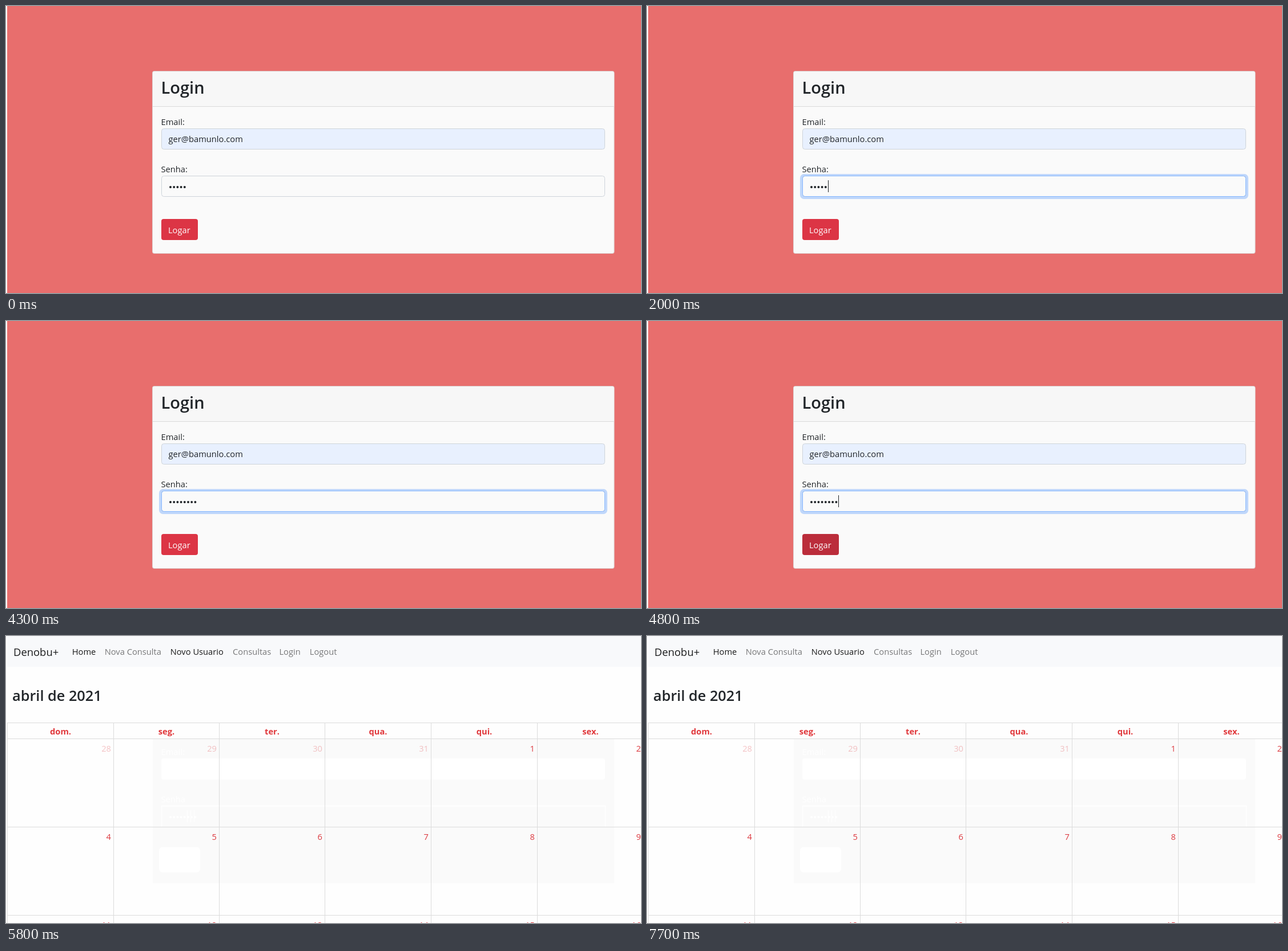
An HTML page for the animation above (8 s loop, 1112 px wide and 504 px high).

```html
<!DOCTYPE html>
<html lang="pt-BR">
<head>
<meta charset="utf-8">
<title>Login</title>
<style>
html, body { margin: 0; width: 100%; height: 100%; overflow: hidden; background: #fff; }
svg { display: block; width: 1112px; height: 504px; }
text { font: 400 14.7px "Open Sans", "Noto Sans", sans-serif; fill: #212529; }
.title { font-size: 29px; font-weight: 600; }
.month { font-size: 25.3px; font-weight: 600; }
.brand { font-size: 18.4px; fill: #1a1b1c; }
.head { font-weight: 700; fill: #e0373b; text-anchor: middle; }
.day { fill: #dc3a40; text-anchor: end; }
.out { opacity: .3; }
.white { fill: #fff; }
</style>
</head>
<body>
<svg id="stage" viewBox="0 0 1112 504">
  <g id="login">
    <rect x="2" width="1110" height="504" fill="#e86e6d"/>
    <rect x="256" y="114" width="809.5" height="321" rx="4" fill="#dccfcf"/>
    <rect x="257" y="115" width="807.5" height="319" rx="3" fill="#fafafa"/>
    <path d="M257 176V118a3 3 0 0 1 3-3H1061.5a3 3 0 0 1 3 3V176Z" fill="#f7f7f7"/>
    <rect x="257" y="176" width="807.5" height="1" fill="#dadada"/>
    <text class="title" x="271.5" y="154">Login</text>
    <text x="271.5" y="209">Email:</text>
    <rect x="272.5" y="215.5" width="776" height="36" rx="4" fill="#e8f0fe" stroke="#ced4da"/>
    <text x="284.5" y="239">ger@bamunlo.com</text>
    <text x="271.5" y="292">Senha:</text>
    <rect id="ring" x="268" y="295" width="785" height="44" rx="7" fill="#bfd7fb"/>
    <rect x="272.5" y="298.5" width="776" height="36" rx="4" fill="#fafafa" stroke="#ced4da"/>
    <rect id="edge" x="272.5" y="298.5" width="776" height="36" rx="4" fill="none" stroke="#86b7fe"/>
    <g id="dots" fill="#212529"></g>
    <rect id="caret" y="306" width="1" height="21" fill="#212529"/>
    <rect id="halo" x="268" y="370.5" width="72" height="44.5" rx="7" fill="#eea7ae"/>
    <rect id="button" x="272" y="374" width="64" height="37" rx="4"/>
    <text class="white" x="284" y="399">Logar</text>
  </g>
  <g id="agenda">
    <rect x="2" width="1110" height="504" fill="#fefefe"/>
    <rect x="2" width="1110" height="54" fill="#f8f9fb"/>
    <text class="brand" x="13" y="35">Denobu+</text>
    <text class="month" x="11" y="114">abril de 2021</text>
    <g id="ghost">
      <path d="M257 181H1065V434H257Z" fill="#fafafa"/>
      <text class="white" x="271.5" y="209">Email:</text>
      <rect class="white" x="272" y="215" width="777" height="37" rx="4"/>
      <text class="white" x="271.5" y="292">Senha</text>
      <path d="M272.5 335V298.5H1049.5V335" fill="none" stroke="#fff" stroke-width="1.5"/>
      <g id="ghostDots" fill="#fff"></g>
      <rect class="white" x="268" y="370.5" width="72" height="44.5" rx="6"/>
    </g>
  </g>
</svg>
<script>
const $ = id => document.getElementById(id);

function add(parent, tag, attrs, label) {
  const el = document.createElementNS("http://www.w3.org/2000/svg", tag);
  for (const k in attrs) el.setAttribute(k, attrs[k]);
  if (label !== undefined) el.textContent = label;
  parent.appendChild(el);
  return el;
}

// Password bullets
const dots = [];
for (let i = 0; i < 8; i++) {
  const at = { cx: 288 + 6.2 * i, cy: 318, r: 2 };
  dots.push(add($("dots"), "circle", at));
  add($("ghostDots"), "circle", at);
}
for (const x of [317, 323, 329]) add($("ghostDots"), "rect", { x, y: 306, width: 1, height: 21 });

// Navigation
const agenda = $("agenda");
const nav = [
  ["Home", 115.7, .9], ["Nova Consulta", 172.7, .52], ["Novo Usuario", 287.7, .9],
  ["Consultas", 397, .52], ["Login", 478.5, .52], ["Logout", 531.8, .52]
].map(([label, x, shade]) => add(agenda, "text", { x, y: 33, style: `fill:rgba(0,0,0,${shade})` }, label));

// Calendar grid
const cols = [2, 188, 373, 558, 744, 930, 1116];
for (const x of cols.slice(0, 6)) add(agenda, "rect", { x, y: 152, width: 1, height: 352, fill: "#dcdcdc" });
for (const y of [152, 180, 335, 490]) add(agenda, "rect", { x: 2, y, width: 1110, height: 1, fill: "#dcdcdc" });
["dom.", "seg.", "ter.", "qua.", "qui.", "sex."].forEach((name, c) => {
  add(agenda, "text", { class: "head", x: (cols[c] + cols[c + 1]) / 2 + .5, y: 173 }, name);
  for (let r = 0; r < 3; r++) {
    const n = 28 + c + 7 * r, out = n < 32;
    add(agenda, "text", { class: out ? "day out" : "day", x: cols[c + 1] - 4, y: 203 + 155 * r }, out ? n : n - 31);
  }
});

const within = (t, a, b) => t >= a && t < b;
const show = (el, on) => el.setAttribute("visibility", on ? "visible" : "hidden");

function focusAt(t) {
  if (t < 1000 || t >= 5100) return 0;
  if (t < 1100) return .25;
  if (t < 1200) return .85;
  return t < 5000 ? 1 : .5;
}

function draw(t) {
  const onLogin = t < 5800;
  $("login").style.display = onLogin ? "" : "none";
  agenda.style.display = onLogin ? "none" : "";

  const focus = focusAt(t);
  $("ring").setAttribute("opacity", focus);
  $("edge").setAttribute("opacity", focus);

  const count = 5 + [2600, 3500, 3800].filter(k => t >= k).length;
  dots.forEach((d, i) => show(d, i < count));
  $("caret").setAttribute("x", 317 + 6 * (count - 5));
  show($("caret"), within(t, 1000, 1500) || within(t, 2000, 2500) || within(t, 2600, 3100) ||
    within(t, 3500, 4300) || within(t, 4800, 5000));

  $("button").setAttribute("fill", t < 4800 ? "#dc3545" : "#bb2d3b");
  $("halo").setAttribute("opacity", t < 5000 ? 0 : t < 5100 ? .5 : 1);
  nav[1].style.fill = `rgba(0,0,0,${within(t, 7100, 7700) ? .7 : .52})`;
}

const start = performance.now();
function tick() {
  draw((performance.now() - start) % 8000);
  requestAnimationFrame(tick);
}
tick();
</script>
</body>
</html>
```
